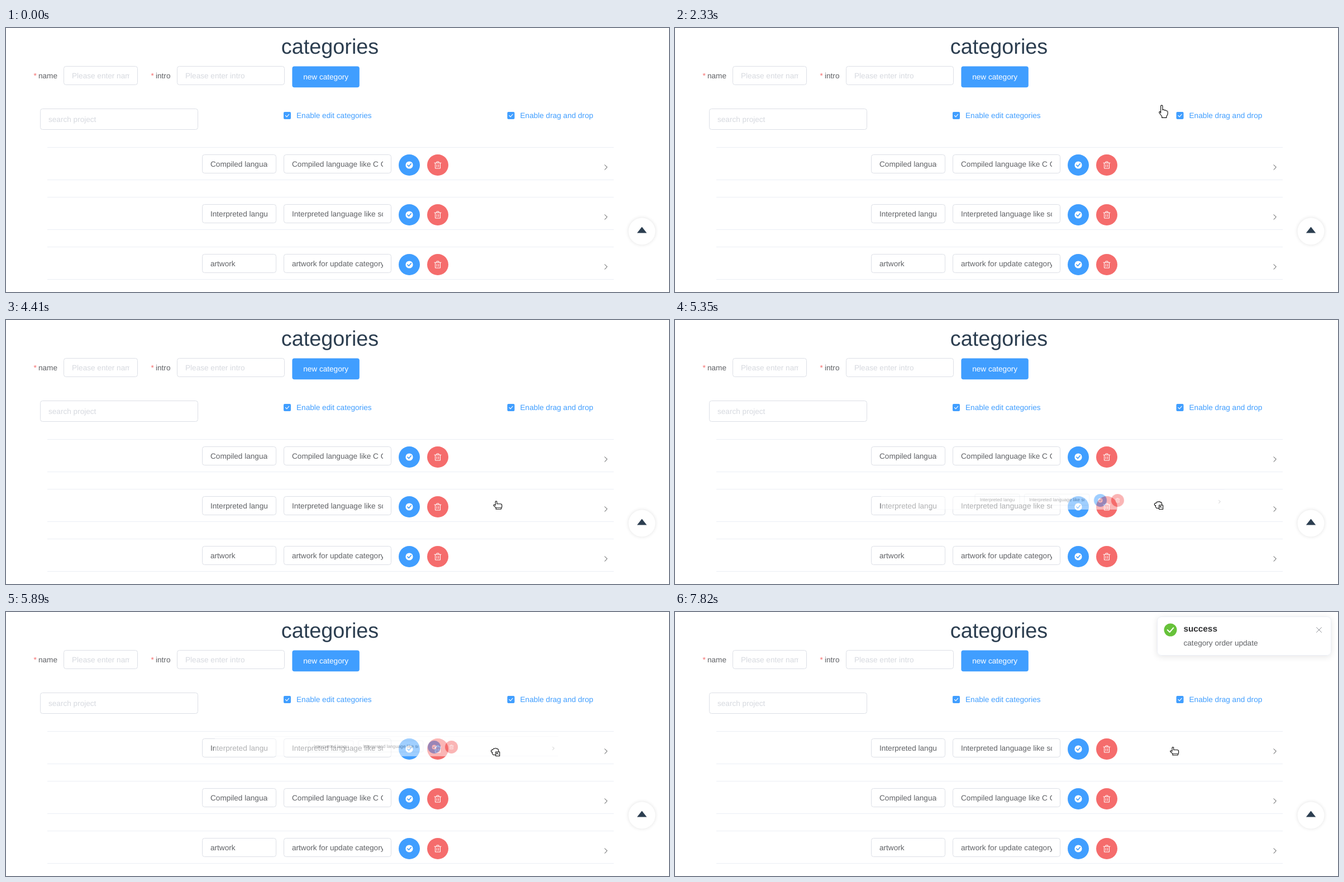
Write an HTML page with a canvas that moves like this. It is 1187 by 472 pixels and loops after 7.99 s.

```html
<!DOCTYPE html>
<html lang="en">
<head>
<meta charset="utf-8">
<title>categories</title>
<style>
html, body { margin: 0; width: 100%; height: 100%; overflow: hidden; background: #fff; }
canvas { display: block; }
</style>
</head>
<body>
<canvas id="stage" width="1187" height="472"></canvas>
<script>
const LOOP = 7990, TICK = 77;
const GRAB = 3255, DRAG = 5280, SWAP = 5660, DROP = 6425, NOTE = 6770;
const BLUE = '#409eff', RED = '#f56c6c', TEXT = '#606266', HINT = '#d6d9df', DARK = '#2c3e50';
const INK = '#303133', BORDER = '#dcdfe6', LINE = '#ebeef5';
const ROW = { x: 74, w: 1014, h: 58.5, pitch: 89.25, top: 213 };
const GHOST_SCALE = 0.606;
const stage = document.getElementById('stage').getContext('2d');
let g = stage;

const compiled = ['Compiled language', 'Compiled language like C C++'];
const interpreted = ['Interpreted language', 'Interpreted language like script'];
const artwork = ['artwork', 'artwork for update category'];

const mix = (a, b, u) => a + (b - a) * u;
const linear = u => u;
const easeOut = u => Math.sin(u * Math.PI / 2);

// Cursor gestures: a bowed line, or part of an ellipse.
const glide = (x0, y0, x1, y1, bow = 0, ease = linear) => u => {
  const e = ease(u);
  return { x: mix(x0, x1, e) + bow * Math.sin(Math.PI * e), y: mix(y0, y1, e) };
};
const orbit = (cx, cy, rx, ry, from, to) => u => {
  const a = mix(from, to, u);
  return { x: cx + rx * Math.cos(a), y: cy + ry * Math.sin(a) };
};

const gestures = [
  { start: 170, end: 400, at: glide(1060, 442, 909, 139, 0, easeOut) },
  { start: 720, end: 1490, at: orbit(888, 141, 57, 51, 0, -5.5) },
  { start: 1570, end: 2330, at: orbit(903, 159, 50, 32, 0.6, -2.4) },
  { start: 2410, end: 3030, at: glide(866, 140, 899, 240, 50) },
  { start: 3490, end: 4260, at: glide(888, 234, 869, 317, -24) },
  { start: 4330, end: 5110, at: glide(870, 319, 884, 340, 0, easeOut) },
  { start: DRAG, end: 6050, at: glide(862, 339, 870, 237, -12, easeOut) },
  { start: DROP, end: 7820, at: glide(880, 241, 886, 240) }
];

function cursorAt(t) {
  const gesture = gestures.findLast(m => m.start <= t);
  if (!gesture) return null;
  const { start, end, at } = gesture;
  const steps = Math.round((end - start) / TICK);
  return at(Math.min(1, Math.floor((t - start) / TICK + 0.15) / steps));
}

function text(str, x, y, color = TEXT, font = '13.6px') {
  g.font = font + ' "Liberation Sans", Arial, sans-serif';
  g.textRendering = 'geometricPrecision';
  g.fillStyle = color;
  g.fillText(str, x, y);
}

function box(x, y, w, h, r, fill, stroke) {
  g.beginPath();
  g.roundRect(x, y, w, h, r);
  if (fill) { g.fillStyle = fill; g.fill(); }
  if (stroke) { g.strokeStyle = stroke; g.lineWidth = 1; g.stroke(); }
}

function disc(x, y, r, color) {
  g.beginPath();
  g.arc(x, y, r, 0, Math.PI * 2);
  g.fillStyle = color;
  g.fill();
}

function path(d, x, y, stroke, width = 1, fill) {
  g.save();
  g.translate(x, y);
  g.lineJoin = g.lineCap = 'round';
  const shape = new Path2D(d);
  if (fill) { g.fillStyle = fill; g.fill(shape); }
  if (stroke) { g.strokeStyle = stroke; g.lineWidth = width; g.stroke(shape); }
  g.restore();
}

function tick(x, y, size, color, width) {
  path(`M${-size} 0L${-size / 4} ${size * 0.75}L${size} ${-size * 0.7}`, x, y, color, width);
}

function shadow(color, blur, dy, draw) {
  g.save();
  g.shadowColor = color;
  g.shadowBlur = blur;
  g.shadowOffsetY = dy;
  draw();
  g.restore();
}

function input(x, y, w, h, value, color) {
  box(x + 0.5, y + 0.5, w - 1, h - 1, 4, '#fff', BORDER);
  g.save();
  g.beginPath();
  g.rect(x + 15, y, w - 30, h);
  g.clip();
  text(value, x + 15, y + h / 2 + 5, color);
  g.restore();
}

function field(x, label, labelX, width, hint) {
  text('*', labelX - 8.5, 90, RED);
  text(label, labelX, 90);
  input(x, 68, width, 34, hint, HINT);
}

function checkbox(x, label) {
  box(x, 150, 13, 13, 2, BLUE);
  tick(x + 6.5, 156.5, 3.1, '#fff', 1.1);
  text(label, x + 23, 161, BLUE);
}

function row([name, intro], y) {
  g.fillStyle = LINE;
  g.fillRect(ROW.x, Math.floor(y), ROW.w, 1);
  g.fillRect(ROW.x, Math.floor(y + 58), ROW.w, 1);
  const top = Math.floor(y + 13), mid = top + 19;
  input(351, top, 133, 34, name);
  input(497, top, 193, 34, intro);
  disc(722, mid, 19, BLUE);
  disc(722, mid, 6.6, '#fff');
  tick(722, mid, 3.2, BLUE, 1.7);
  disc(773, mid, 19, RED);
  path('M-6-3.8H6M-2-4V-6H2V-4M-4.5-3.5V6H4.5V-3.5M-1.6-.8V3.4M1.6-.8V3.4', 773, mid, '#fff');
  path('M-2-4.3L2.3 0L-2 4.3', 1074, mid + 4, INK, 0.9);
}

function page(rows) {
  g.fillStyle = '#fff';
  g.fillRect(0, 0, 1187, 472);
  g.textAlign = 'center';
  text('categories', 580, 46, DARK, '37.8px');
  box(512.4, 68.4, 120.4, 37.8, 4, BLUE);
  text('new category', 572.6, 92, '#fff');
  g.textAlign = 'left';
  field(103, 'name', 58, 133, 'Please enter name');
  field(306, 'intro', 268, 193, 'Please enter intro');
  input(61, 144, 283, 38, 'search project', HINT);
  checkbox(497, 'Enable edit categories');
  checkbox(897.5, 'Enable drag and drop');
  rows.forEach((r, i) => row(r, ROW.top + i * ROW.pitch));
  shadow('rgba(0,0,0,.12)', 6, 0, () => disc(1138.5, 363.5, 24, '#fff'));
  path('M-8.7 5.5L0-5.5L8.7 5.5Z', 1138.5, 361, null, 0, DARK);
}

function makeGhost() {
  const canvas = document.createElement('canvas');
  canvas.width = Math.ceil(ROW.w * GHOST_SCALE);
  canvas.height = Math.ceil(ROW.h * GHOST_SCALE);
  g = canvas.getContext('2d');
  g.fillStyle = '#fff';
  g.fillRect(0, 0, canvas.width, canvas.height);
  g.scale(GHOST_SCALE, GHOST_SCALE);
  g.translate(-ROW.x, 0);
  row(interpreted, 0);
  g = stage;
  return canvas;
}

function notification(t) {
  const u = Math.min(1, (t - NOTE) / 400);
  const x = mix(1187, 863, 1 - Math.pow(1 - u, 2.6));
  shadow('rgba(0,0,0,.1)', 12, 2, () => box(x, 8, 312, 70, 7, '#fff'));
  box(x + 0.5, 8.5, 311, 69, 7, null, LINE);
  disc(x + 24, 32, 11.5, '#67c23a');
  tick(x + 24, 32, 5.3, '#fff', 2);
  text('success', x + 47.5, 35, INK, 'bold 15.3px');
  text('category order update', x + 47.5, 60);
  path('M-4.5-4.5L4.5 4.5M4.5-4.5L-4.5 4.5', x + 290, 32, '#909399');
}

const POINTER = 'M3.5 14.5V2.5a1.7 1.7 0 0 1 3.4 0V9q2.8-1.2 3.3.8q2.6-.8 3 .9q2.8-.4 2.8 2' +
  'v4l-2.2 4.2V23H5.6V20.6L1 14.6Q0 11.8 2.3 12.2Z';
const HAND = 'M4 9V3a1.4 1.4 0 0 1 2.8 0V6.5H13q2.6 0 2.6 2.4V12L14 16H5V13.4L1 9.8Q.2 7.8 2 8Z';
const FIST = 'M3 8.5Q.2 8.3.8 6Q1.5 4 4 4.5Q4.3 1.4 7 2.3Q9.3.6 11 2.6Q14 2.3 14 5.5V10L12 13.5H4.5L2.5 10.5Z';

function cursor(t, { x, y }) {
  const outline = d => path(d, x, y, '#111', 1.15, '#fff');
  if (t < GRAB) {
    outline(POINTER);
  } else if (t >= DRAG && t < DROP) {
    outline(FIST);
    outline('M9 8H16V15.5H9Z');
    path('M11 10L14 13M11 12V10H13', x, y, '#111', 0.9);
  } else {
    outline(HAND);
    path('M5 13.4H14', x, y, '#111', 0.9);
  }
}

const ghost = makeGhost();

function draw(t) {
  page(t < SWAP ? [compiled, interpreted, artwork] : [interpreted, compiled, artwork]);
  const at = cursorAt(t);
  if (at && t >= DRAG && t < DROP) {
    g.globalAlpha = 0.5;
    g.drawImage(ghost, 369 + (at.x - 858) / 2, at.y - 20);
    g.globalAlpha = 1;
  }
  if (t >= NOTE) notification(t);
  if (at) cursor(t, at);
}

const begin = performance.now();
function frame() {
  draw((performance.now() - begin) % LOOP);
  requestAnimationFrame(frame);
}
frame();
</script>
</body>
</html>
```
